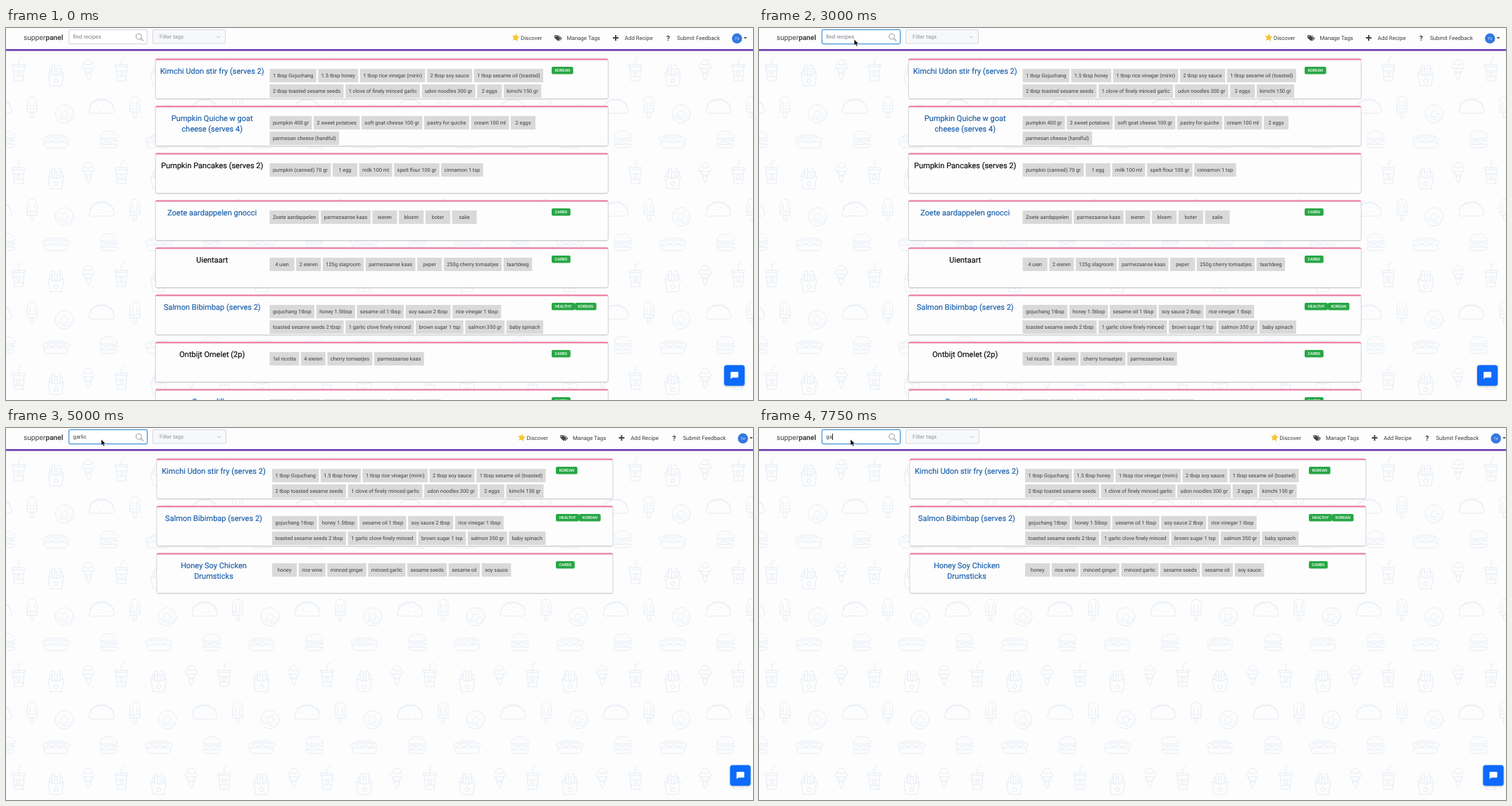
An HTML page for the animation above (8 s loop, 1061 px wide and 528 px high).

```html
<!DOCTYPE html>
<html lang="en">
<head>
<meta charset="utf-8">
<title>Recipe search</title>
<style>
  html, body { margin: 0; width: 100%; height: 100%; overflow: hidden; background: #fdfdfd; }
  svg { display: block; width: 1061px; height: 528px; }
  text { font-family: Roboto, sans-serif; text-rendering: geometricPrecision; white-space: pre; }
  .title { font-size: 11.03px; text-anchor: middle; stroke-width: .16px; }
  .chip { font-size: 7.37px; fill: #3f3f3f; text-anchor: middle; }
  .badge { font-size: 5.53px; font-weight: 500; fill: #fff; text-anchor: middle; }
  .field { font-size: 7.74px; }
  .nav text { font-size: 7.92px; fill: #3c3c3c; }
  .food { fill: none; stroke: #e4ecf5; stroke-width: 1; stroke-linejoin: round; stroke-linecap: round; }
</style>
</head>
<body>
<svg id="stage" viewBox="0 0 1061 528" xmlns="http://www.w3.org/2000/svg">
  <defs>
    <g id="tile" class="food">
      <g transform="translate(18 58)"><path d="M-9-6H9V-3H-9ZM-8-3-6 17H6L8-3M-7 3H7M-6 11H6M0-6V-14L5-17"/><circle cy="7" r="2.5"/></g>
      <g transform="translate(71 67)"><path d="M-11-3Q0 4 11-3L8 15H-8ZM-9-3V-9H-6V-1M-6-6V-14H-2V0M-2-10H2V0M2-14H6V-1M6-9H9V-3"/><circle cy="8" r="3"/></g>
      <g transform="translate(117 58)"><path d="M-8-1C-10-5-7-6-6-7-6-11-3-13 0-13S6-11 6-7C7-6 10-5 8-1ZM-6-1-1 15H1L6-1M-5 3 3 7M5 3-3 7M-6-7Q0-4 6-7"/></g>
      <g transform="translate(37 112)"><path d="M-7 7V-8A7 7 0 0 1 7-8V7ZM-2 7V15Q0 17 2 15V7M-3-8V1M3-8V1M-7 3H7"/></g>
      <g transform="translate(83 122)"><circle r="13"/><circle r="4.5"/><path d="M-10 2Q-7 7-4 7T3 9 10 3M-7-5-5-6M3-8 5-7M7-1 8 1M-6 3-5 5M2 6 4 5"/></g>
      <g transform="translate(136 112)"><path d="M-18 7C-17-5-9-10 0-10S17-5 18 7Q17 9 14 9H-14Q-17 9-18 7ZM-16 0C-18-5-13-8-11-7-9-11-4-12-1-10 4-13 9-10 10-7 15-7 17-3 16 0M-8-1-7 0M2-4 3-3M7 2 8 3M-3 4-2 4"/></g>
      <g transform="translate(71 161)"><path d="M-16-1Q-20-1-19-4-18-6-15-6H15Q18-6 19-4 20-1 16-1M-17 1H17Q18 9 12 9H-12Q-18 9-17 1ZM-13-6Q-12-9-8-9H8Q12-9 13-6M-14-2Q-11-5-8-2T-2-2 4-2 10-2 14-2"/></g>
      <g transform="translate(146 158)"><path d="M-12-2C-12-9-7-12 0-12S12-9 12-2ZM-12 1H12M-13 3Q-9 7-6 4T1 4 7 4 13 3M-12 7H12Q12 12 8 12H-8Q-12 12-12 7ZM-5-8-4-7M1-9 2-8M5-6 6-5"/></g>
    </g>
    <pattern id="foods" y="33" width="146" height="146" patternUnits="userSpaceOnUse">
      <g transform="translate(0 -33)"><use href="#tile"/><use href="#tile" x="-146"/></g>
    </pattern>
    <filter id="soft" x="-30%" y="-30%" width="160%" height="170%">
      <feDropShadow dx="0" dy="1" stdDeviation="1.5" flood-opacity=".25"/>
    </filter>
  </defs>

  <rect width="1061" height="528" fill="#fdfdfd"/>
  <rect y="33" width="1061" height="495" fill="url(#foods)"/>
  <g id="lists"></g>

  <rect width="1061" height="30" fill="#fdfdfd"/>
  <rect y="30" width="1061" height="2.5" fill="#6a35b3"/>
  <text x="25" y="17" font-size="10.2" fill="#444">supper<tspan font-weight="700">panel</tspan></text>

  <rect id="glow" x="89.5" y="2.5" width="111" height="20" rx="2" fill="none" stroke="#b5d8f5" stroke-width="2"/>
  <rect id="box" x="89.5" y="2.5" width="111" height="20" rx="1.5" fill="#fff"/>
  <text id="query" class="field" x="95.3" y="15.3"></text>
  <rect id="caret" y="8" width="1" height="9" fill="#222"/>
  <g fill="none" stroke="#b1b6bd" stroke-width="1.4"><circle cx="188.6" cy="12" r="3.9"/><path d="M191.5 15 195 18.4" stroke-width="1.8"/></g>

  <rect id="filter" x="208.5" y="2.5" height="19.5" rx="1.5" fill="#f7f8fa" stroke="#d3dae3"/>
  <text class="field" x="218" y="15.3" fill="#8d949c">Filter tags</text>
  <path id="chevron" d="M-2-1 0 1.2 2-1" fill="none" stroke="#adb3ba" stroke-width=".9"/>

  <g id="right">
    <g class="nav">
      <path id="star" fill="#f8c62c" stroke="#e9ac1d" stroke-width=".4"/>
      <text x="731" y="16.5">Discover</text>
      <path d="M779 10.3H783L787.6 14.8 784 18.4 779 14ZM784.3 10.3H785.2L789.8 14.8 786 18.6 785.3 18 788.3 14.8Z" fill="#444"/>
      <circle cx="780.8" cy="12" r=".8" fill="#fff"/>
      <text x="796.5" y="16.5">Manage Tags</text>
      <path d="M862 14H870M866 10V18" stroke="#444" stroke-width="1.9"/>
      <text x="878.8" y="16.5">Add Recipe</text>
      <text x="938" y="17.6" style="font-size:10px;font-weight:700">?</text>
      <text x="953" y="16.5">Submit Feedback</text>
    </g>
    <circle cx="1038.3" cy="14.8" r="7.2" fill="#3478e0"/>
    <text x="1038.3" y="16.6" font-size="5" fill="#fff" text-anchor="middle">TV</text>
    <path d="M1047.8 13H1052.4L1050.1 15.5Z" fill="#444"/>
    <rect x="1020" y="478.5" width="29.2" height="29.2" rx="3.5" fill="#086bfb" filter="url(#soft)"/>
    <path d="M1030.3 488H1039Q1040.2 488 1040.2 489.2V495Q1040.2 496.2 1039 496.2H1031.5L1029.2 498.5V489.2Q1029.2 488 1030.3 488Z" fill="#fff"/>
  </g>

  <path id="cursor" d="M0 0V8.7L2 6.9 3.4 10 4.9 9.3 3.5 6.3H6.2Z" fill="#000" stroke="#fff" stroke-width=".5"/>
</svg>

<script>
const $ = id => document.getElementById(id);
const BLUE = '#1b5fa9', BLACK = '#0b0b0b';
const LOOP = 8000, STEP = 250;

// title lines | ingredients, rows split by "/" | badges
const recipe = (color, title, chips, badges = '') => ({
  color,
  lines: title.split('/'),
  rows: chips.split('/').map(row => row.split(',')),
  badges: badges ? badges.split(',') : []
});
const kimchi = recipe(BLUE, 'Kimchi Udon stir fry (serves 2)',
  '1 tbsp Gojuchang,1.5 tbsp honey,1 tbsp rice vinegar (mirin),2 tbsp soy sauce,1 tbsp sesame oil (toasted)/2 tbsp toasted sesame seeds,1 clove of finely minced garlic,udon noodles 300 gr,2 eggs,kimchi 150 gr', 'KOREAN');
const salmon = recipe(BLUE, 'Salmon Bibimbap (serves 2)',
  'gojuchang 1tbsp,honey 1.5tbsp,sesame oil 1 tbsp,soy sauce 2 tbsp,rice vinegar 1 tbsp/toasted sesame seeds 2 tbsp,1 garlic clove finely minced,brown sugar 1 tsp,salmon 350 gr,baby spinach', 'HEALTHY,KOREAN');
const drumsticks = recipe(BLUE, 'Honey Soy Chicken/Drumsticks',
  'honey,rice wine,minced ginger,minced garlic,sesame seeds,sesame oil,soy sauce', 'CARBS');
const common = [
  kimchi,
  recipe(BLUE, 'Pumpkin Quiche w goat/cheese (serves 4)',
    'pumpkin 400 gr,2 sweet potatoes,soft goat cheese 100 gr,pastry for quiche,cream 100 ml,2 eggs/parmesan cheese (handful)'),
  recipe(BLACK, 'Pumpkin Pancakes (serves 2)', 'pumpkin (canned) 70 gr,1 egg,milk 100 ml,spelt flour 100 gr,cinnamon 1 tsp'),
  recipe(BLUE, 'Zoete aardappelen gnocci', 'Zoete aardappelen,parmezaanse kaas,eieren,bloem,boter,salie', 'CARBS'),
  recipe(BLACK, 'Uientaart', '4 uien,2 eieren,125g slagroom,parmezaanse kaas,peper,250g cherry tomaatjes,taartdeeg', 'CARBS'),
  salmon
];
const lists = {
  all: [...common,
    recipe(BLACK, 'Ontbijt Omelet (2p)', '1el ricotta,4 eieren,cherry tomaatjes,parmezaanse kaas', 'CARBS'),
    recipe(BLUE, 'Quesadillas', 'wraps,bonen,paprika,geraspte kaas,mais,salsa', 'CARBS')],
  partial: [...common,
    recipe(BLACK, 'Zalmpasta', 'zalm,rode pesto,courgette,kookroom,rode paprika', 'HEALTHY'),
    drumsticks],
  matches: [kimchi, salmon, drumsticks]
};
const wide = { card: 212.3, width: 643, title: 292.8, chips: 374.5, badges: 775 };
const full = { card: 214, width: 648, title: 295, chips: 378, badges: 781 };

const pen = document.createElement('canvas').getContext('2d');
const measure = (text, size, weight = 400) => {
  pen.font = `${weight} 100px Roboto, sans-serif`;
  return pen.measureText(text).width * size / 100;
};
const rect = (x, y, w, h, fill, extra = '') =>
  `<rect x="${x}" y="${y}" width="${w}" height="${h}" fill="${fill}" ${extra}/>`;
const label = (kind, x, y, text, extra = '') => `<text class="${kind}" x="${x}" y="${y}" ${extra}>${text}</text>`;

function drawRow(words, x, y, kind, height, size, weight, pad, gap, min, fill, radius, drop) {
  return words.map(word => {
    const w = Math.max(min, measure(word, size, weight) + 2 * pad);
    const out = rect(x, y, w, height, fill, `rx="${radius}"`) + label(kind, x + w / 2, y + drop, word);
    x += w + gap;
    return out;
  }).join('');
}

function drawCard(item, index, at) {
  const top = 44 + index * 67;
  const frame = rect(at.card, top + 1.2, at.width, 56.4, '#000', 'rx="3" opacity=".16"') +
    rect(at.card, top, at.width, 56.5, '#fdfdfd', 'rx="2.5" stroke="#c9c9c9" stroke-width=".8"') +
    `<path d="M${at.card - .3} ${top + 1.6}Q${at.card} ${top - .5} ${at.card + 2} ${top - .5}h${at.width - 4}q2 0 2.3 2.1Z" fill="#ee759f"/>`;
  const title = item.lines.map((line, i) =>
    label('title', at.title, top + 21 + i * 15.2, line, `fill="${item.color}" stroke="${item.color}"`)).join('');
  const chips = item.rows.map((row, i) =>
    drawRow(row, at.chips, top + 14 + i * 22, 'chip', 19, 7.37, 400, 4.42, 2.6, 35.1, '#d9d9d9', .5, 12.1)).join('');
  const badges = drawRow(item.badges, at.badges, top + 11, 'badge', 10.4, 5.53, 500, 4.6, 0, 0, '#28a745', 2, 7.1);
  return frame + title + chips + badges;
}

$('lists').innerHTML = Object.entries(lists).map(([name, items]) =>
  `<g id="${name}">${items.map((item, i) => drawCard(item, i, name === 'matches' ? full : wide)).join('')}</g>`).join('');

$('star').setAttribute('d', 'M' + Array.from({ length: 10 }, (_, i) => {
  const r = i % 2 ? 2.5 : 5.2, a = i * Math.PI / 5 - Math.PI / 2 + .15;
  return `${724 + r * Math.cos(a)} ${13.7 + r * Math.sin(a)}`;
}).join('L') + 'Z');

// [start time, typed letters, caret shown]
const typing = [
  [0, 0, 0], [1500, 0, 1], [2000, 0, 0], [2500, 0, 1], [3000, 0, 0],
  [3250, 1, 1], [3500, 2, 1], [3750, 3, 1], [4000, 4, 1], [4250, 5, 1], [4500, 6, 1],
  [5000, 6, 0], [5500, 6, 1], [6000, 6, 0], [6500, 6, 1],
  [7000, 5, 0], [7250, 4, 0], [7500, 4, 1], [7750, 2, 1]
];
const pointer = [[0, -20, -20], [1000, 169.5, -4], [1250, 140.3, 17.5], [1500, 135.2, 16], [6000, 130, 16]];
const caretStops = [95, 100, 104, 107, 109, 111, 114];
const current = (track, t) => track.filter(key => key[0] <= t).pop();
const set = (id, values) => Object.entries(values).forEach(([key, value]) => $(id).setAttribute(key, value));

let lastTick = -1;
function render(now) {
  const tick = Math.floor(now % LOOP / STEP);
  if (tick !== lastTick) {
    lastTick = tick;
    const t = tick * STEP;
    const [, count, caret] = current(typing, t);
    const [, x, y] = current(pointer, t);
    const focused = t >= 1500, filtered = t >= 3500;
    const shown = filtered ? 'matches' : count ? 'partial' : 'all';
    for (const name in lists) set(name, { display: name === shown ? 'inline' : 'none' });
    $('query').textContent = 'garlic'.slice(0, count) || 'find recipes';
    set('query', { fill: count ? '#3d4348' : '#757c84' });
    set('caret', { x: caretStops[count], opacity: caret });
    set('glow', { opacity: focused ? 1 : 0 });
    set('box', { stroke: focused ? '#3c91d9' : '#cfd7e1' });
    set('filter', { width: filtered ? 104 : 103 });
    set('chevron', { transform: `translate(${filtered ? 302.6 : 301.6} 12.6)` });
    set('right', { transform: `translate(${filtered ? 8.4 : 0} 0)` });
    set('cursor', { transform: `translate(${x} ${y})` });
  }
  requestAnimationFrame(() => render(performance.now()));
}
render(performance.now());
</script>
</body>
</html>
```
